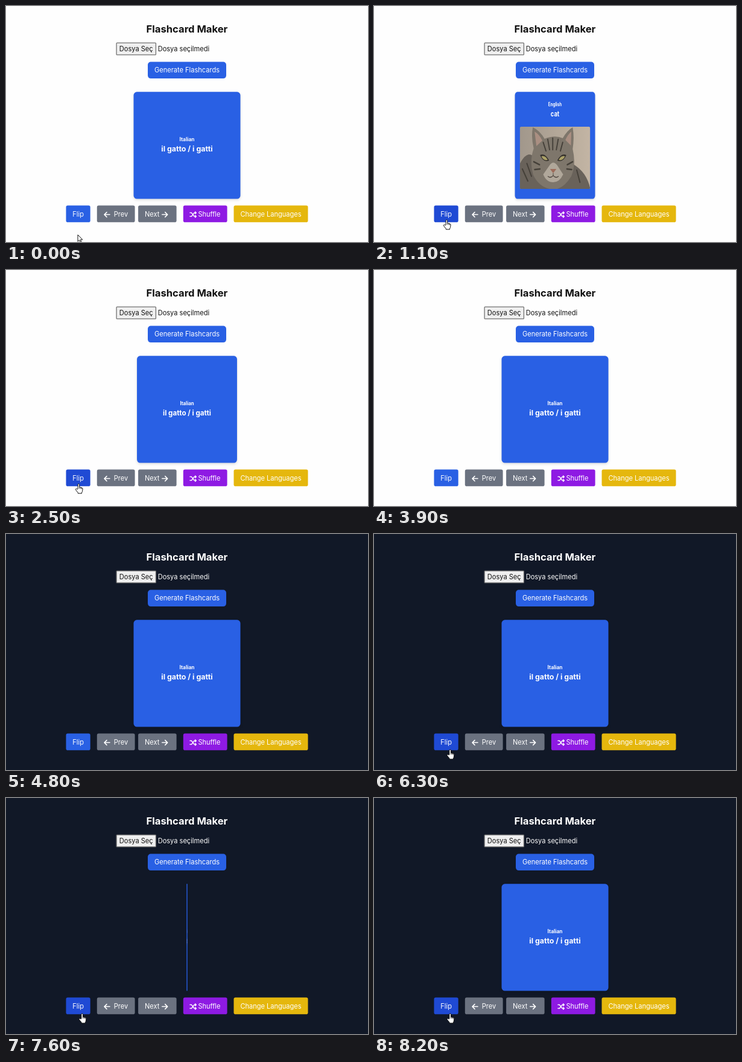
An HTML page that plays this animation: 600 px wide and 391 px high, repeating every 8300 ms.

```html
<!DOCTYPE html>
<html lang="en">
<head>
<meta charset="utf-8">
<title>Flashcard Maker</title>
<style>
  html, body { margin: 0; width: 100%; height: 100%; overflow: hidden; }
  svg { display: block; width: 600px; height: 391px; background: #fefefe; --ink: #111; }
  svg.dark { background: #111827; --ink: #fff; }
  text { font: 400 11.05px Inter, sans-serif; fill: #fff; }
  .ink { fill: var(--ink); }
  .title { font-size: 16.6px; font-weight: 700; }
  .label { font-size: 8.3px; font-weight: 700; }
  .word { font-size: 12.4px; font-weight: 700; }
  .mid { text-anchor: middle; }
  .blue { fill: #2960e4; }
  #flip.hover { fill: #1f4ad4; }
  .gray { fill: #6b7280; }
  .icon { fill: none; stroke: #fff; stroke-width: 1.5; stroke-linecap: round; stroke-linejoin: round; }
  #card { filter: drop-shadow(0 2px 2px #0002); }
  #cursor path { fill: #fff; stroke: #111; stroke-width: 1; stroke-linejoin: round; }
</style>
</head>
<body>
<svg id="stage" viewBox="0 0 600 391">
  <defs>
    <clipPath id="photo"><rect x="-77.5" y="200" width="155" height="103" rx="2.8"/></clipPath>
    <linearGradient id="wall">
      <stop offset="0" stop-color="#a1978b"/>
      <stop offset="1" stop-color="#c3b5a4"/>
    </linearGradient>
  </defs>

  <text class="ink title mid" x="300" y="44">Flashcard Maker</text>
  <rect x="183.1" y="61.1" width="65.3" height="19.8" rx="1" fill="#efefef" stroke="#707070" stroke-width="1.3"/>
  <text class="mid" x="215.7" y="75.2" style="fill:#111">Dosya Seç</text>
  <text class="ink" x="251.7" y="75.2">Dosya seçilmedi</text>
  <rect class="blue" x="235" y="92.5" width="130" height="27.6" rx="5"/>
  <text class="mid" x="300" y="110.3">Generate Flashcards</text>

  <g id="card">
    <rect class="blue" x="-88.5" y="142.3" width="177" height="177.2" rx="5.5"/>
    <g id="front">
      <text class="label mid" y="224">Italian</text>
      <text class="word mid" y="240.8">il gatto / i gatti</text>
    </g>
    <g id="back">
      <text class="label mid" y="166.4">English</text>
      <text class="word mid" y="183.4">cat</text>
      <g clip-path="url(#photo)">
        <rect x="-78" y="200" width="156" height="103" fill="url(#wall)"/>
        <path fill="#69625a" d="M-78 262Q-62 238-46 250L40 262Q70 275 78 303H-78Z"/>
        <path fill="#7e766b" d="M-49 201Q-34 206-23 220Q0 213 17 219Q27 206 39 201Q43 218 39 237Q47 262 36 282Q18 304-4 304Q-34 302-48 280Q-57 258-47 236Q-53 218-49 201Z"/>
        <path fill="#aa8f82" d="M-45 208Q-34 213-28 223L-41 232ZM36 208Q28 213 23 222L35 231Z"/>
        <path fill="#b0a79a" d="M-12 264Q-4 255 5 264L18 279Q10 292-4 292Q-19 292-26 279Z"/>
        <path fill="none" stroke="#454039" stroke-width="2.5" stroke-linecap="round" d="M-5 219V238M-16 221L-12 238M7 221L3 238M-26 226L-20 240M17 226L12 240M-47 258L-34 263M-45 271L-33 270M39 258L27 263M37 271L26 270M-72 270L-60 290M-62 261L-52 282M48 272L55 292"/>
        <path fill="#35312c" d="M-33 247Q-22 243-13 256Q-26 260-33 247ZM25 247Q14 243 5 256Q18 260 25 247Z"/>
        <path fill="#aaa067" d="M-30 249Q-22 247-16 255Q-25 257-30 249ZM22 249Q14 247 8 255Q17 257 22 249Z"/>
        <path fill="#9d6c5b" d="M-11 270H3L-4 277Z"/>
        <path fill="none" stroke="#4a413a" stroke-width="1.3" d="M-4 277V281Q-10 286-16 282M-4 281Q2 286 8 282"/>
      </g>
    </g>
  </g>

  <rect id="flip" class="blue" x="99.5" y="330.6" width="40.2" height="27.6" rx="2.8"/>
  <text class="mid" x="119.6" y="348.5">Flip</text>
  <rect class="gray" x="150.8" y="330.6" width="62.8" height="27.6" rx="2.8"/>
  <path class="icon" d="M172 345.6H163M167 341.6L163 345.6L167 349.6"/>
  <text x="178.8" y="348.5">Prev</text>
  <rect class="gray" x="219.1" y="330.6" width="63.5" height="27.6" rx="2.8"/>
  <text x="230" y="348.5">Next</text>
  <path class="icon" d="M258.7 345.6H267.7M263.7 341.6L267.7 345.6L263.7 349.6"/>
  <rect x="293.8" y="330.6" width="72.8" height="27.6" rx="2.8" fill="#8e1ae3"/>
  <path class="icon" d="M305 342.6H307.5L312 348.6H315M305 348.6H307.5L312 342.6H315M313.6 341L315.2 342.6L313.6 344.2M313.6 347L315.2 348.6L313.6 350.2"/>
  <text x="318.4" y="348.5">Shuffle</text>
  <rect x="377.5" y="330.6" width="123" height="27.6" rx="2.8" fill="#e5b70d"/>
  <text class="mid" x="439" y="348.5">Change Languages</text>

  <g id="cursor">
    <path id="arrow" d="M0 0V11.2L2.6 8.8L4.3 12.6L6 11.8L4.3 8.1H7.8Z"/>
    <g id="hand">
      <path d="M-1.4 8.5V1.3a1.3 1.3 0 0 1 2.6 0V5.5L5.2 6.5Q6.7 7 6.6 8.6L6 12.4Q5.8 13.6 5 14.6V15.8H-1.2V14.6L-5 10Q-5.7 8.7-4.6 8.2Q-3.6 7.8-2.6 8.9Z"/>
      <path d="M1.2 5.5V8.3M3.2 6V8.5M5 6.5V8.8" style="stroke-width:.7"/>
    </g>
  </g>
</svg>
<script>
const LOOP = 8300, FLIP_TIME = 1000, DARK_AT = 4200;
const flips = [605, 1887, 6261, 7250];
// time, x, y of the pointer tip
const pointer = [
  [0, 119, 379], [100, 119, 379], [400, 120.5, 354.3], [2600, 120.5, 354.3],
  [3050, 122, 396], [5150, 128, 396], [5650, 125, 356], [6000, 125, 356],
  [6100, 126.3, 357.2], [LOOP, 126.3, 357.2]
];
const $ = id => document.getElementById(id);
const clamp = v => Math.min(1, Math.max(0, v));
const show = (id, on) => $(id).style.display = on ? "" : "none";

// cubic-bezier(.4, 0, .2, 1)
function ease(x) {
  let lo = 0, hi = 1;
  for (let i = 0; i < 24; i++) {
    const t = (lo + hi) / 2, u = 1 - t;
    if (1.2 * t * u * u + 0.6 * t * t * u + t * t * t < x) lo = t; else hi = t;
  }
  return lo * lo * (3 - 2 * lo);
}

function pointerAt(time) {
  const next = pointer.findIndex(p => p[0] > time);
  const a = pointer[next - 1], b = pointer[next];
  const k = (time - a[0]) / (b[0] - a[0]);
  return [a[1] + (b[1] - a[1]) * k, a[2] + (b[2] - a[2]) * k];
}

function draw(time) {
  const turns = flips.reduce((sum, start) => sum + ease(clamp((time - start) / FLIP_TIME)), 0);
  const width = Math.cos(turns * Math.PI);
  $("card").setAttribute("transform", `translate(300 0) scale(${Math.max(Math.abs(width), 0.001)} 1)`);
  show("front", width >= 0);
  show("back", width < 0);

  const [x, y] = pointerAt(time), hover = y < 358.2;
  $("cursor").setAttribute("transform", `translate(${x} ${y})`);
  show("hand", hover);
  show("arrow", !hover);
  $("flip").classList.toggle("hover", hover);
  $("stage").classList.toggle("dark", time >= DARK_AT);
}

function tick() {
  draw(performance.now() % LOOP);
  requestAnimationFrame(tick);
}
tick();
</script>
</body>
</html>
```
